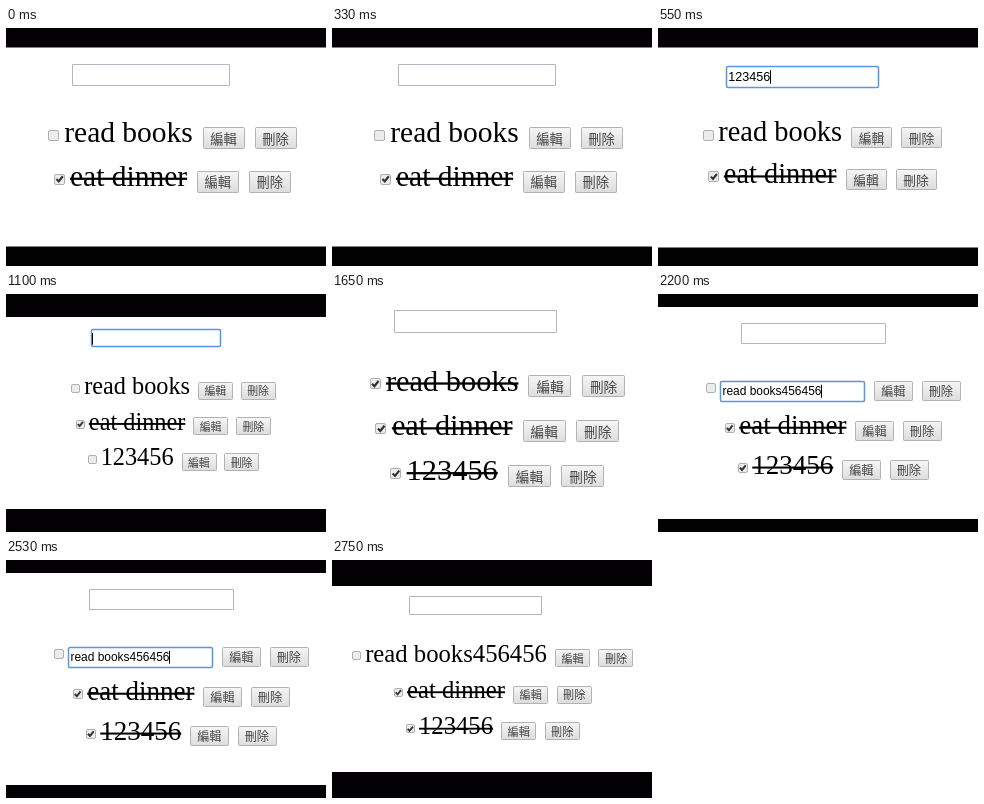
Write an HTML page with a canvas that moves like this. It is 320x238 px and loops after 3.3 s.

```html
<!DOCTYPE html>
<html lang="zh-Hant">
<meta charset="utf-8">
<title>Todo list</title>
<style>
  html, body { margin: 0; overflow: hidden; background: #000; }
  canvas { display: block; }
</style>
<canvas width="320" height="238"></canvas>
<script>
const ctx = document.querySelector('canvas').getContext('2d');
const STEP = 550;
const SERIF = '"Liberation Serif", "Times New Roman", serif';
const SANS = '"Liberation Sans", Arial, sans-serif';
const CJK = '"Noto Sans CJK TC", "Noto Sans CJK", sans-serif';

// One page at several zooms: em is the list font size, cx the row centre, base the first baseline.
const read = { text: 'read books' }, eat = { text: 'eat dinner', done: true }, num = { text: '123456' };
const done = item => ({ ...item, done: true });
const scenes = [
  { em: 29.5, cx: 166.5, base: 115, band: [19.5, 218.5], rows: [read, eat] },
  { em: 28.4, cx: 164.5, base: 114, band: [19.5, 219.5], rows: [read, eat], typed: '123456' },
  { em: 24.3, cx: 167.3, base: 100.5, band: [23, 215], rows: [read, eat, num], typed: '' },
  { em: 30.4, cx: 165.5, base: 97.5, band: [0, 238], rows: [done(read), eat, done(num)] },
  { em: 27, cx: 175, base: 101, band: [13, 225], rows: [{ edit: 'read books456456' }, eat, done(num)] },
  { em: 24.7, cx: 160.8, base: 102.3, band: [26, 212], rows: [{ text: 'read books456456' }, eat, done(num)] },
];

function box(x, y, w, h, r, fill, stroke, line = 1) {
  x = Math.round(x) + .5;
  y = Math.round(y) + .5;
  ctx.beginPath();
  ctx.roundRect(x, y, Math.round(w) - 1, Math.round(h) - 1, r);
  ctx.fillStyle = fill;
  ctx.fill();
  ctx.strokeStyle = stroke;
  ctx.lineWidth = line;
  ctx.stroke();
}

function label(text, x, y, size, family, color = '#000') {
  ctx.font = `${size}px ${family}`;
  ctx.fillStyle = color;
  ctx.fillText(text, x, y);
  return ctx.measureText(text).width;
}

function field(x, y, w, em, value) {
  const focused = value !== undefined;
  box(x, y, w, .76 * em, focused ? 1.5 : 0, '#fff', focused ? '#5b95e2' : '#b4b6bd', focused ? 1.5 : 1);
  if (!focused) return;
  const end = x + .08 * em + label(value, x + .08 * em, y + .53 * em, .443 * em, SANS);
  ctx.fillRect(Math.floor(end), y + .15 * em, 1, .48 * em);
}

function checkbox(x, y, em, checked) {
  const s = .37 * em;
  box(x, y, s, s, 1.5, '#ececec', '#b0b0b0');
  if (!checked) return;
  ctx.beginPath();
  ctx.moveTo(x + .22 * s, y + .5 * s);
  ctx.lineTo(x + .43 * s, y + .72 * s);
  ctx.lineTo(x + .8 * s, y + .25 * s);
  ctx.strokeStyle = '#333';
  ctx.lineWidth = .2 * s;
  ctx.stroke();
}

function button(text, x, y, em) {
  const h = .74 * em, shade = ctx.createLinearGradient(0, y, 0, y + h);
  shade.addColorStop(0, '#f6f6f6');
  shade.addColorStop(1, '#dcdcdc');
  box(x, y, 1.43 * em, h, 1, shade, '#b2b2b2');
  label(text, x + .26 * em, y + .56 * em, .45 * em, CJK, '#444');
}

function drawRow({ text, done, edit }, cx, y, em) {
  ctx.font = `${em}px ${SERIF}`;
  const width = edit ? 5.37 * em : ctx.measureText(text).width;
  const left = cx - (width + 4.06 * em) / 2;
  const x = left + .54 * em;
  checkbox(left, y - .44 * em, em, done);
  if (edit) field(x, y - .53 * em, width, em, edit);
  else label(text, x, y - .03 * em, em, SERIF);
  if (done) ctx.fillRect(x, y - .3 * em, width, .075 * em);
  const next = x + width + .33 * em;
  button('編輯', next, y - .53 * em, em);
  button('刪除', next + 1.76 * em, y - .53 * em, em);
}

function draw({ em, cx, base, band: [top, bottom], rows, typed }) {
  ctx.fillStyle = '#020002';
  ctx.fillRect(0, 0, 320, 238);
  ctx.fillStyle = '#fff';
  ctx.fillRect(0, top, 320, bottom - top);
  field(cx - 3.4 * em, base - 2.68 * em, 5.37 * em, em, typed);
  rows.forEach((row, i) => drawRow(row, cx, base + i * 1.475 * em, em));
}

function tick(now) {
  draw(scenes[Math.floor(now / STEP) % scenes.length]);
  requestAnimationFrame(tick);
}
tick(performance.now());
</script>
</html>
```
